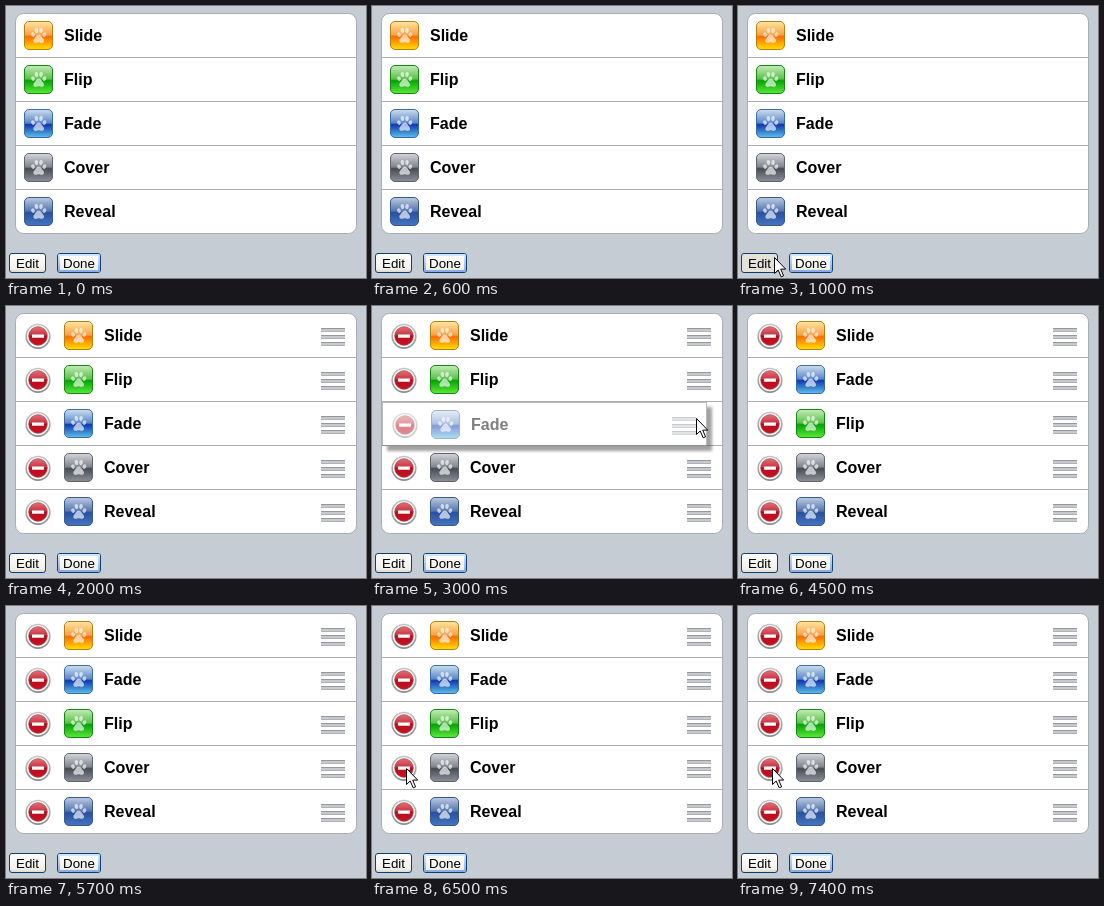
Write an HTML page that moves like this. It is 360 by 272 pixels and loops after 8000 ms.

```html
<!DOCTYPE html>
<html lang="en">
<head>
<meta charset="utf-8">
<title>Sortable list</title>
<style>
html, body { margin: 0; width: 100%; height: 100%; overflow: hidden; background: #c5ccd4; }
svg { display: block; width: 360px; height: 272px; }
text { font-family: "Liberation Sans", Arial, sans-serif; fill: #000; }
.name { font-size: 16px; font-weight: bold; }
.btn { font-size: 13.33px; }
</style>
</head>
<body>
<svg id="stage" viewBox="0 0 360 272" xmlns="http://www.w3.org/2000/svg">
  <defs>
    <linearGradient id="red" x2="0" y2="1">
      <stop offset="0" stop-color="#e0707a"/><stop offset=".45" stop-color="#c83440"/>
      <stop offset=".5" stop-color="#b80c1c"/><stop offset="1" stop-color="#c41424"/>
    </linearGradient>
    <linearGradient id="ring" x2="0" y2="1">
      <stop offset="0" stop-color="#c4c4c4"/><stop offset="1" stop-color="#8c8c8c"/>
    </linearGradient>
    <linearGradient id="face" x2="0" y2="1">
      <stop offset="0" stop-color="#fff"/><stop offset=".8" stop-color="#f1f0ea"/>
      <stop offset="1" stop-color="#dad6cb"/>
    </linearGradient>
    <linearGradient id="focus" x2="0" y2="1">
      <stop offset="0" stop-color="#cee7ff"/><stop offset="1" stop-color="#89ade4"/>
    </linearGradient>
    <filter id="blur" x="-10%" y="-30%" width="120%" height="160%"><feGaussianBlur stdDeviation="1.8"/></filter>
    <clipPath id="outside"><path clip-rule="evenodd" d="M-10-10H350V70H-10ZM0 0H325V44H0Z"/></clipPath>
    <g id="paw" fill="#fff">
      <ellipse cx="9" cy="13.6" rx="1.8" ry="2.3" transform="rotate(-25 9 13.6)"/>
      <ellipse cx="12.4" cy="9.6" rx="1.8" ry="2.6" transform="rotate(-8 12.4 9.6)"/>
      <ellipse cx="17" cy="9.6" rx="1.8" ry="2.6" transform="rotate(8 17 9.6)"/>
      <ellipse cx="20.4" cy="13.6" rx="1.8" ry="2.3" transform="rotate(25 20.4 13.6)"/>
      <path d="M14.7 13.6C17 13.6 17.6 16 19 17.4C21 19.4 19.8 22 17.6 21.8C16 21.6 15.8 21.2 14.7 21.2S13.4 21.6 11.8 21.8C9.6 22 8.4 19.4 10.4 17.4C11.8 16 12.4 13.6 14.7 13.6Z"/>
    </g>
    <g id="minus">
      <circle cx="22" cy="22.3" r="11.8" fill="#fff" stroke="url(#ring)" stroke-width="1.6"/>
      <circle cx="22" cy="22" r="9.3" fill="url(#red)" stroke="#a83640" stroke-width=".7"/>
      <rect x="16" y="20.5" width="12" height="3.2" fill="#fff"/>
    </g>
    <g id="grip">
      <g id="bar"><path fill="#c6cad0" d="M0 14h24v4h-24z"/><path fill="#96989c" d="M0 14h24v1h-24z"/><path fill="#aeb1b5" d="M0 17h24v1h-24z"/></g>
      <use href="#bar" y="7"/><use href="#bar" y="14"/>
    </g>
  </defs>
  <rect width="360" height="272" fill="#c5ccd4"/>
  <rect x="9.5" y="7.5" width="341" height="220" rx="8" fill="#fff" stroke="#a9acb0"/>
  <path d="M10 51.5H350M10 95.5H350M10 139.5H350M10 183.5H350" stroke="#adadad"/>
  <g id="rows"></g>
  <g id="ghost" opacity=".5">
    <g clip-path="url(#outside)"><rect x="5" y="5" width="325" height="44" fill="#444" filter="url(#blur)"/></g>
    <rect x=".5" y=".5" width="324" height="43" fill="#fff" stroke="#777"/>
    <g id="held"></g>
  </g>
  <g id="buttons"></g>
  <path id="cursor" d="M.5.5V16.5L4.2 13L7.2 19.8L9.6 18.8L6.7 12.1H11.7Z" fill="#fff" stroke="#000"/>
</svg>
<script>
const $ = id => document.getElementById(id);

// name: [rim, gloss top, gloss bottom, body top, body bottom]
const skins = {
  Slide: ['#b9800f', '#fbe7a0', '#fca048', '#ff6c00', '#ffe000'],
  Flip: ['#128a12', '#c4ecb8', '#5cc04c', '#04a404', '#5ce83c'],
  Fade: ['#3a6aa8', '#cce0ec', '#5c86ca', '#1038b0', '#5cc0e8'],
  Cover: ['#60646c', '#d4d7dc', '#80848c', '#484c54', '#8c9098'],
  Reveal: ['#385890', '#bccbe2', '#5676ae', '#2850a0', '#4676be']
};

const defs = document.querySelector('defs');
for (const [name, [, a, b, c, d]] of Object.entries(skins)) {
  defs.innerHTML += `<linearGradient id="${name}" x2="0" y2="1">
    <stop offset="0" stop-color="${a}"/><stop offset=".48" stop-color="${b}"/>
    <stop offset=".54" stop-color="${c}"/><stop offset="1" stop-color="${d}"/></linearGradient>`;
}

const icon = (name, x) => `<g transform="translate(${x} 7)">
  <rect x=".5" y=".5" width="28" height="28" rx="4.5" fill="url(#${name})" stroke="${skins[name][0]}"/>
  <use href="#paw" opacity=".65"/></g>`;

function row(name, editing, gripX = 305) {
  const x = editing ? 48 : 8;
  return (editing ? `<use href="#minus"/><use href="#grip" x="${gripX}"/>` : '') +
    icon(name, x) + `<text class="name" x="${x + 40}" y="27">${name}</text>`;
}

function button(label, x, w, state) {
  const fill = state === 'down' ? '#e3e1d9' : 'url(#face)';
  const inner = state === 'focus'
    ? `<rect x="${x + 2}" y="249" width="${w - 4}" height="16" rx="1" fill="none" stroke="url(#focus)" stroke-width="2"/>` : '';
  return `<rect x="${x + .5}" y="247.5" width="${w - 1}" height="19" rx="2.5" fill="${fill}" stroke="#0d3f70"/>` +
    inner + `<text class="btn" x="${x + w / 2}" y="262" text-anchor="middle">${label}</text>`;
}

const before = ['Slide', 'Flip', 'Fade', 'Cover', 'Reveal'];
const after = ['Slide', 'Fade', 'Flip', 'Cover', 'Reveal'];
const steps = [
  { at: 0, order: before },
  { at: 1000, order: before, cursor: [36, 251], press: true },
  { at: 2000, order: before, edit: true },
  { at: 3000, order: before, edit: true, drag: 96, cursor: [324, 112] },
  { at: 4000, order: after, edit: true, drag: 63, cursor: [325, 81] },
  { at: 4500, order: after, edit: true },
  { at: 6500, order: after, edit: true, cursor: [34, 162] }
];

$('held').innerHTML = row('Fade', true, 289);
$('held').setAttribute('transform', 'translate(1 1)');

function show(id, pos) {
  $(id).style.display = pos ? '' : 'none';
  if (pos) $(id).setAttribute('transform', `translate(${pos})`);
}

let shown;
function draw(ms) {
  const step = steps.findLast(s => s.at <= ms);
  if (step === shown) return;
  shown = step;
  $('rows').innerHTML = step.order.map((name, i) => step.drag && name === 'Fade' ? '' :
    `<g transform="translate(10 ${8 + 44 * i})">${row(name, step.edit)}</g>`).join('');
  show('ghost', step.drag && [10, step.drag]);
  show('cursor', step.cursor);
  $('buttons').innerHTML = button('Edit', 3, 37, step.press ? 'down' : '') + button('Done', 51, 44, 'focus');
}

function tick() {
  draw(performance.now() % 8000);
  requestAnimationFrame(tick);
}
tick();
</script>
</body>
</html>
```
